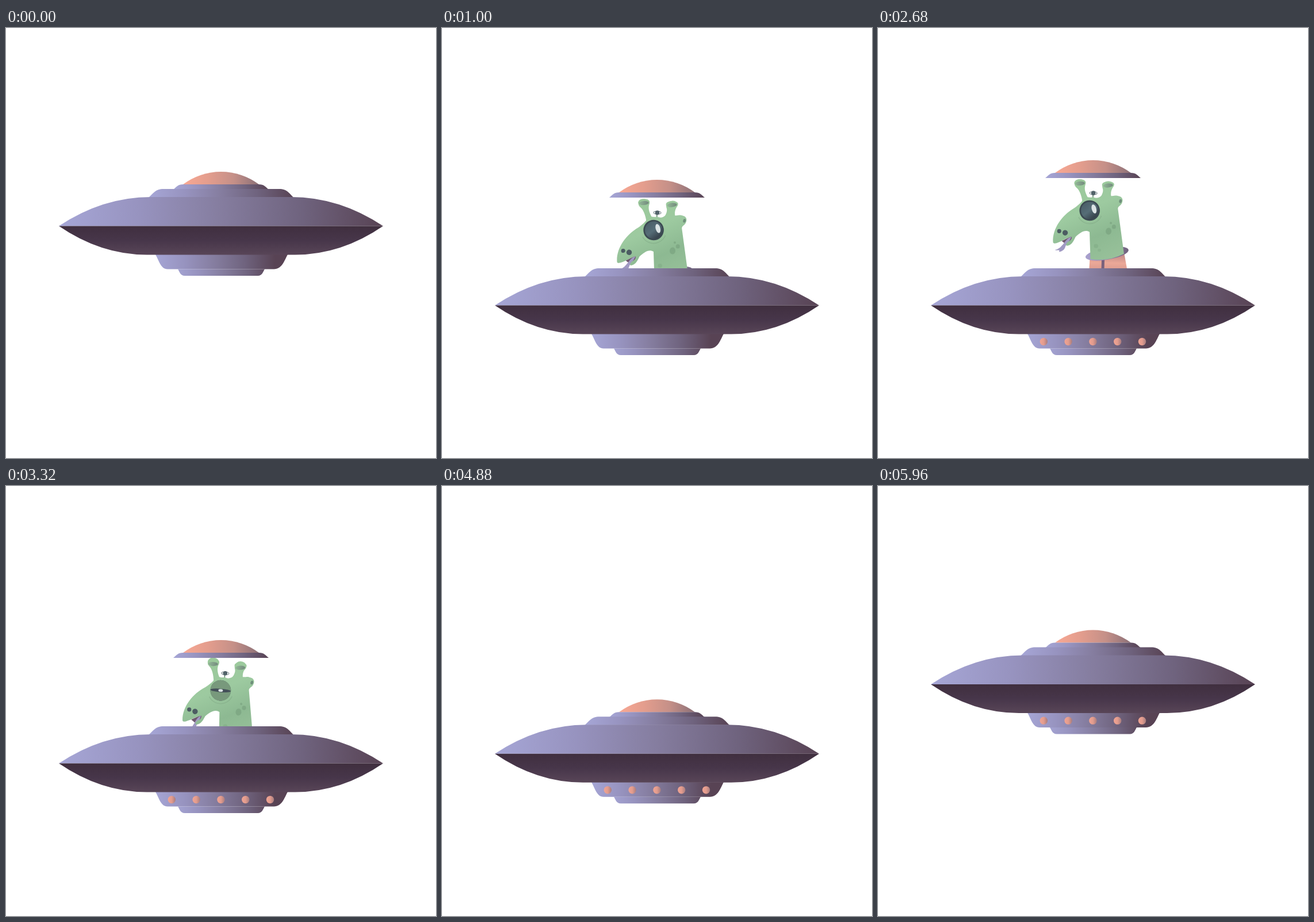
Animation of 748x748 px, one loop 6000 ms. Source, as an HTML page with a canvas:

```html
<!DOCTYPE html>
<html lang="en">
<head>
<meta charset="utf-8">
<title>Visitor</title>
<style>
html, body { margin: 0; width: 100%; height: 100%; overflow: hidden; background: #fff; }
canvas { display: block; width: 100vw; height: 100vh; object-fit: contain; }
</style>
</head>
<body>
<canvas id="stage" width="748" height="748"></canvas>
<script>
const ctx = document.getElementById('stage').getContext('2d');
const LOOP = 6000, STEP = 40, DROP = 138, LIFT = 158;

const clamp = v => Math.max(0, Math.min(1, v));
const ramp = (t, a, b) => clamp((t - a) / (b - a));
const smooth = v => v * v * (3 - 2 * v);

// Piecewise linear value through [time, value] pairs
function track(t, keys) {
  for (let i = 1; i < keys.length; i++) {
    const [t0, v0] = keys[i - 1], [t1, v1] = keys[i];
    if (t < t1) return v0 + (v1 - v0) * ramp(t, t0, t1);
  }
  return keys[keys.length - 1][1];
}

function gradient(x0, y0, x1, y1, colors) {
  const g = ctx.createLinearGradient(x0, y0, x1, y1);
  colors.forEach((c, i) => g.addColorStop(i / (colors.length - 1), c));
  return g;
}

function shape(path, fill) {
  ctx.fillStyle = fill;
  ctx.fill(new Path2D(path));
}

function oval(x, y, rx, ry, fill, turn = 0) {
  ctx.fillStyle = fill;
  ctx.beginPath();
  ctx.ellipse(x, y, rx, ry, turn, 0, Math.PI * 2);
  ctx.fill();
}

// Draw something turned about a pivot
function turned(x, y, angle, paint) {
  ctx.save();
  ctx.translate(x, y);
  ctx.rotate(angle);
  ctx.translate(-x, -y);
  paint();
  ctx.restore();
}

const METAL = ['#a6a6d6', '#9793bf', '#857d9f', '#6f637e', '#584354'];
const metal = (x0, x1) => gradient(x0, 0, x1, 0, METAL);

function drawShip(lights) {
  shape('M260 394 C266 404 269 419.500 281 419.500 H466 C480 419.500 484 405 490 394 Z', metal(258, 468));
  shape('M299 419.500 C302 424 303 431 311 431 H438 C446 431 447 424 450 419.500 Z', metal(290, 465));
  shape('M248.500 294.500 C256 288 260 280 274 280 H475 C489 280 493 288 500 294.500 Z', metal(249, 500));
  shape('M92 344.500 Q168 294 252 294 H496 Q580 294 656 344.500 Z', metal(92, 656));
  shape('M92 344.500 H656 Q583 394.500 503 394.500 H245 Q165 394.500 92 344.500 Z',
    gradient(0, 345, 0, 394, ['#402f3f', '#47364a', '#584557']));
  for (let i = 0; i < lights; i++) {
    const x = 288.3 + 42.8 * i;
    oval(x, 407.6, 6.7, 6.7, gradient(x - 7, 0, x + 7, 0, ['#f1a493', '#e39c8e', '#a57c7e']));
  }
}

function drawDome() {
  shape('M308 272 A110 110 0 0 1 440 272 Z',
    gradient(308, 0, 440, 0, ['#f8a894', '#e39d8d', '#c59088', '#8c7077']));
  shape('M291 281 C297 276 299 272 308 272 H440 C449 272 451 276 457 281 Z', metal(291, 457));
}

function drawEye(closed) {
  const x = 365, y = 317.5;
  ctx.lineWidth = 1.5;
  ctx.strokeStyle = 'rgba(125,165,130,.45)';
  ctx.beginPath();
  ctx.arc(x, y + 1, 22, .35, 2.6);
  ctx.stroke();
  oval(x, y, 17.8, 17.8, '#3c4a52');
  oval(x, y, 15, 15, gradient(x - 10, y - 12, x + 10, y + 12, ['#4b5f69', '#566d77', '#354049']));
  oval(x + 7.5, y - 3, 4, 8, '#dce4e5', -.3);
  if (closed > 0) {
    const gap = 17.8 - 14.8 * closed;
    oval(x, y, 18, 18, '#78997c');
    oval(x, y, 17.8, gap, '#434f58');
    oval(x + 7.5 * (1 - closed), y, 4, gap * .8, '#dce4e5');
  }
}

function drawAntenna() {
  ctx.strokeStyle = '#7c9a86';
  ctx.lineWidth = 2;
  ctx.beginPath();
  ctx.moveTo(370, 296);
  ctx.lineTo(370, 288);
  ctx.stroke();
  ctx.lineWidth = 1;
  ctx.strokeStyle = '#6d7b80';
  ctx.beginPath();
  ctx.ellipse(370.5, 287, 6.5, 2.5, 0, 0, Math.PI * 2);
  ctx.stroke();
  oval(370.5, 287, 3.8, 3.8, '#52636a');
}

// The opening slides down the ear as the head leans
function drawEar(path, x, y, skin, sway) {
  shape(path, skin);
  oval(x, y + sway, 10, 5 + 3 * sway, skin, -.1);
  oval(x, y + 3 * sway, 8.5, 3.6, gradient(x - 8, 0, x + 8, 0, ['#91b596', '#748b7e']), -.15);
}

function drawHead(sway, tilt, closed) {
  const skin = gradient(335, 275, 400, 405, ['#9bc99b', '#9dcaa0', '#8db992', '#98c19a']);

  // Suit and collar
  shape('M368 398 L366 460 H442 L427 388 Z', gradient(0, 395, 0, 420, ['#c78e89', '#eba898', '#dc9b8f']));
  shape('M388.500 402 H393.500 V460 H388.500 Z', '#79617c');
  oval(397.5, 391.5, 38, 10.5, gradient(360, 0, 435, 0, ['#aaa2cf', '#9389b1', '#70617c']), -.2);

  // Mouth and tongue
  shape('M318 372 L338 361 L335 374 L325 377 Z', '#70596f');
  turned(334, 366, -.25 * sway, () =>
    shape('M335 364 C326 366 323 373 317 378 C313 382 309 384 304 384.500 C307 386 310 385 312 386 L311 388.500 C318 388 322 384 323 380 C326 375 331 372 335 364 Z', '#a099c3'));

  // Ears
  turned(357, 297, tilt * 1.4, () =>
    drawEar('M336 272 C335 266 342 264 348 264.500 C356 265 356 269 355 273 C353 281 357 289 362 296 L352 302 C350 293 346 284 341 280 C338 278 336 275 336 272 Z',
      345.5, 270, skin, sway));
  turned(392, 293, tilt * .4, () =>
    drawEar('M385 273 C384 267 393 266 399 266.500 C406 267 407 270 405 274 C401 280 400 286 402 293 L382 296 C387 288 388 282 386 278 Z',
      395.5, 271.5, skin, sway));
  drawAntenna();

  // Head and neck
  shape('M303 374 C301 351 317 327 338 314 C346 308 351 303 354 297 C359 292 363 296 370 294 C376 296 380 296 385 291 C391 287 397 291 402 291 C408 291 409 289 415 291 C421 292 423 297 421 302 C419 308 414 308 414 313 L427 391 Q400 406 369 402 L366 355 C358 350 349 357 342 364 C339 370 337 378 328 380 C324 380 326 376 329 373 C334 371 336 367 335 364 C326 366 320 372 309 376 C306 377 303 377 303 374 Z', skin);
  oval(418, 299.5, 2.3, 3.3, '#6f8f7b', .2);

  const mark = 'rgba(112,153,119,.48)';
  oval(399, 352.5, 5, 6, mark);
  oval(408, 344.5, 3.5, 3.7, mark);
  oval(402.5, 338, 2, 2, mark);
  oval(378, 379, 3.8, 3.5, 'rgba(112,153,119,.28)');
  oval(384, 386, 3, 2.5, 'rgba(112,153,119,.22)');
  oval(313.2, 355, 3.6, 3.6, '#4c5c62');
  oval(323.6, 357.5, 4.7, 4.7, '#4c5c62');
  drawEye(closed);
}

function drawAlien(sway, closed) {
  const tilt = sway * 3.7 * Math.PI / 180;
  ctx.translate(0, 2 * sway);
  turned(398, 420, tilt, () => drawHead(sway, tilt, closed));
}

function draw(t) {
  const ship = DROP * (ramp(t, 0, 1000) - ramp(t, 4730, 5965));
  const lift = track(t, [[400, 0], [1165, LIFT], [3110, LIFT], [3200, 142], [3320, 120], [3840, 11], [3893, 0]]);
  const lid = ship - lift;
  const lights = Math.max(0, Math.min(5, Math.floor((t - 1340) / 160) + 1));
  const sway = .8 - .8 * smooth(ramp(t, 600, 1500)) + 1.25 * smooth(ramp(t, 2300, 3200));
  const closed = Math.min(ramp(t, 3200, 3300), 1 - ramp(t, 3360, 3460));

  ctx.fillStyle = '#fff';
  ctx.fillRect(0, 0, 748, 748);

  if (lift > 0) {
    ctx.save();
    ctx.beginPath();
    ctx.rect(0, 276 + lid, 748, 8 + lift);
    ctx.clip();
    ctx.translate(0, lid + 20);
    drawAlien(sway, closed);
    ctx.restore();
  }

  ctx.save();
  ctx.translate(0, lid);
  drawDome();
  ctx.restore();

  ctx.save();
  ctx.translate(0, ship);
  drawShip(lights);
  ctx.restore();
}

const start = performance.now();
function tick(now) {
  const t = Math.max(0, now - start) % LOOP;
  draw(Math.floor(t / STEP) * STEP);
  requestAnimationFrame(tick);
}
draw(0);
requestAnimationFrame(tick);
</script>
</body>
</html>
```
